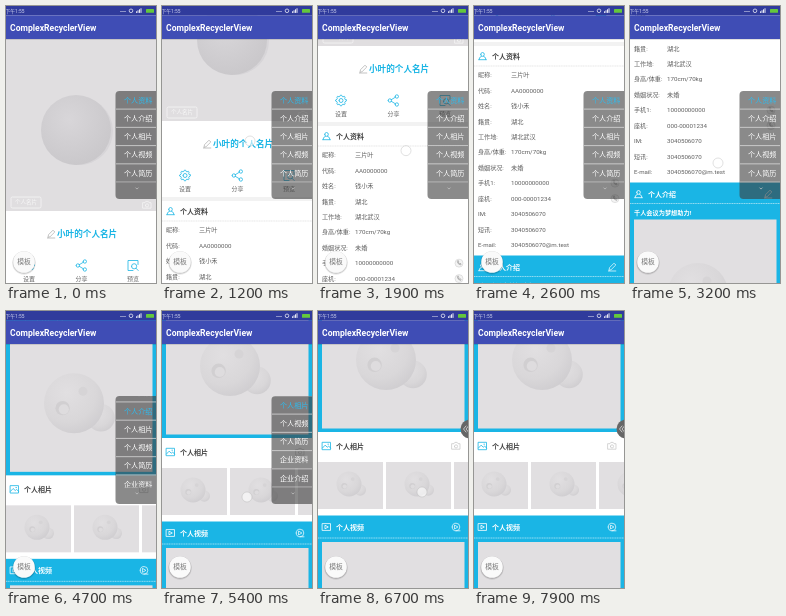
These frames come from a looping animation (150x277 px, 8 s). An HTML page:

```html
<!DOCTYPE html>
<html lang="zh-CN">
<head>
<meta charset="utf-8">
<style>
  html, body { margin: 0; width: 100%; height: 100%; overflow: hidden; background: #fff; }
  svg { display: block; width: 100vw; height: 100vh; }
  text { font-family: Roboto, "Noto Sans CJK SC", "Noto Sans CJK", sans-serif; }
</style>
</head>
<body>
<svg id="stage" viewBox="0 0 150 277" xmlns="http://www.w3.org/2000/svg"></svg>
<script>
const BLUE = '#1ab5e5', GRAY = '#e1dfe1', BOLD = 'font-weight="700"';
const LOOP = 8000, STEP = 100;

// Drawing helpers; text is placed by its vertical centre.
const text = (x, y, s, size, fill, extra = '') =>
  `<text x="${x}" y="${y + size * 0.36}" font-size="${size}" fill="${fill}" ${extra}>${s}</text>`;
const centered = (x, y, s, size, fill) => text(x, y, s, size, fill, 'text-anchor="middle"');
const rect = (x, y, w, h, fill, extra = '') =>
  `<rect x="${x}" y="${y}" width="${w}" height="${h}" fill="${fill}" ${extra}/>`;
const circle = (x, y, r, fill, extra = '') =>
  `<circle cx="${x}" cy="${y}" r="${r}" fill="${fill}" ${extra}/>`;
const icon = (x, y, d, color, width = 0.8) =>
  `<path transform="translate(${x} ${y})" d="${d}" fill="none" stroke="${color}" stroke-width="${width}" stroke-linecap="round" stroke-linejoin="round"/>`;
const dashes = (y, color) =>
  `<path d="M0 ${y}H150" stroke="${color}" stroke-width=".7" stroke-dasharray="1.2 .5"/>`;

// Outline of an eight-toothed wheel around a round hub.
const gear = 'M' + Array.from({ length: 32 }, (_, i) => {
  const angle = (i - 0.5) * Math.PI / 16, r = i % 4 < 2 ? 5.4 : 4.2;
  return `${(r * Math.cos(angle)).toFixed(2)} ${(r * Math.sin(angle)).toFixed(2)}`;
}).join('L') + 'zM-2 0a2 2 0 1 0 4 0a2 2 0 1 0 -4 0';

const ICONS = {
  gear,
  person: 'M-1.8 -1.6a1.8 1.9 0 1 0 3.6 0a1.8 1.9 0 1 0 -3.6 0M-3.6 3.7q.3 -3 2.5 -3.4M3.6 3.7q-.3 -3 -2.5 -3.4M-3.6 3.7H3.6',
  pencil: 'M-3 3l.6 -2.4l4.4 -4.4l1.8 1.8l-4.4 4.4zM-3.6 4H3.8',
  picture: 'M-4 -3.7H4V3.7H-4zM-4 2l2.6 -2.8l2.2 2l1.3 -1.2L4 2M1.4 -1.8h.6',
  video: 'M-4 -3.4H4V3.4H-4zM-1.2 -1.6L1.8 0L-1.2 1.6z',
  camera: 'M-4 -2.3h2l.8 -1.3h2.4l.8 1.3h2v5.5H-4zM-1.6 .4a1.6 1.6 0 1 0 3.2 0a1.6 1.6 0 1 0 -3.2 0',
  reel: 'M-3.8 0a3.8 3.8 0 1 0 7.6 0a3.8 3.8 0 1 0 -7.6 0M-1.2 -1.8L1.9 0L-1.2 1.8zM0 3.8H4',
  share: 'M-5.4 0a1.7 1.7 0 1 0 3.4 0a1.7 1.7 0 1 0 -3.4 0M1.6 -4a1.7 1.7 0 1 0 3.4 0a1.7 1.7 0 1 0 -3.4 0M1.6 4a1.7 1.7 0 1 0 3.4 0a1.7 1.7 0 1 0 -3.4 0M-2.2 -.8L1.7 -3.2M-2.2 .8L1.7 3.2',
  preview: 'M5 -1V-5H-5V5H0M-1.5 .8a2.6 2.6 0 1 0 5.2 0a2.6 2.6 0 1 0 -5.2 0M3 2.8L5.2 5',
  phone: 'M-1.7 -1.6q.3 2.8 3.3 3.4l.5 -1l-1.2 -.8l-.6 .5q-.8 -.4 -1 -1.2l.5 -.5l-.6 -1.2z'
};

// Pale embossed placeholder, r being the radius of the large ball.
const planet = (x, y, r) =>
  circle(x + r * 0.9, y + r * 0.48, r * 0.46, 'url(#ball)') +
  circle(x, y, r, 'url(#ball)') +
  circle(x - r * 0.38, y + r * 0.16, r * 0.24, '#d1cfd1') +
  circle(x - r * 0.34, y + r * 0.2, r * 0.17, '#dedcde') +
  circle(x + r * 0.3, y - r * 0.4, r * 0.15, '#d6d4d6');

const heading = (y, label, left, right, dark) => {
  const color = dark ? '#444' : '#fff';
  return icon(8.5, y, ICONS[left], dark ? BLUE : '#fff') +
    text(18, y, label, 7, color, BOLD) +
    (right ? icon(138, y, ICONS[right], dark ? '#c4c4c4' : '#fff', 0.7) : '');
};

const rows = [
  ['昵称', '三片叶'], ['代码', 'AA0000000'], ['姓名', '钱小禾'], ['籍贯', '湖北'],
  ['工作地', '湖北武汉'], ['身高/体重', '170cm/70kg'], ['婚姻状况', '未婚'],
  ['手机1', '10000000000'], ['座机', '000-00001234'], ['IM', '3040506070'],
  ['短讯', '3040506070'], ['E-mail', '3040506070@m.test']
];
const profile = rows.map(([label, value], i) => {
  const y = 314 + i * 15.45;
  const phone = i === 7 || i === 8
    ? circle(141, y, 4, '#f4f4f4', 'stroke="#c8c8c8" stroke-width=".5"') + icon(141, y, ICONS.phone, '#999', 0.7) : '';
  return text(4, y, label + ':', 6.1, '#5c5c5c') + text(37, y, value, 6.2, '#5c5c5c') + phone;
}).join('');

const actions = [[23, '设置', 'gear'], [75.5, '分享', 'share'], [127, '预览', 'preview']]
  .map(([x, label, name]) => icon(x, 259.5, ICONS[name], BLUE) + centered(x, 272.5, label, 6, '#666')).join('');

const cards = Array.from({ length: 6 }, (_, i) =>
  rect(i * 68, 707, 65, 47, GRAY) + planet(i * 68 + 31, 729, 12.5)).join('');

const page =
  rect(0, 32, 150, 173, '#e0dee0') + circle(73, 125, 34, '#d7d5d8') + circle(70, 124, 35, 'url(#cover)') +
  rect(5, 191, 30, 11, 'none', 'rx="1.5" stroke="#f8f8f8" stroke-width=".7"') +
  centered(20, 196.5, '个人名片', 5.5, '#f8f8f8') + icon(141, 199, ICONS.camera, '#f8f8f8', 0.7) +
  icon(45, 228, ICONS.pencil, '#aaa', 0.7) + text(51, 228, '小叶的个人名片', 8.6, BLUE, BOLD) +
  actions + rect(0, 281, 150, 4, '#f2f2f2') +
  heading(295, '个人资料', 'person', '', true) + dashes(305, '#ddd') + profile +
  rect(0, 494.5, 150, 182.5, BLUE) + heading(506, '个人介绍', 'person', 'pencil') + dashes(515.5, '#c4ecf8') +
  text(4, 525, '千人会议为梦想助力!', 6.2, '#fff', BOLD) +
  rect(4, 531.5, 142.5, 142, GRAY) + planet(68, 605, 30) +
  heading(691, '个人相片', 'picture', 'camera', true) + `<g id="cards">${cards}</g>` +
  rect(0, 760.5, 150, 100, BLUE) + heading(772, '个人视频', 'video', 'reel') + dashes(783, '#c4ecf8') +
  rect(4, 787, 142.5, 70, GRAY);

const ITEM = 18.25;
const menuItems = ['个人资料', '个人介绍', '个人相片', '个人视频', '个人简历', '企业资料', '企业介绍']
  .map((label, i) => `<g class="item">${text(118, 94 + i * ITEM, label, 7.1, 'currentColor')}</g>` +
    `<path d="M110 ${103.1 + i * ITEM}H150" stroke="#e4e4e4" stroke-width=".7"/>`).join('');

stage.innerHTML = `
  <defs>
    <radialGradient id="ball" cx=".38" cy=".32" r=".75">
      <stop stop-color="#e1dfe1"/><stop offset=".65" stop-color="#d9d7d9"/><stop offset="1" stop-color="#cecccf"/>
    </radialGradient>
    <radialGradient id="cover" cx=".4" cy=".35" r=".7">
      <stop stop-color="#d8d6d9"/><stop offset="1" stop-color="#c9c7ca"/>
    </radialGradient>
    <clipPath id="menuClip"><rect x="110" y="85" width="40" height="91.6"/></clipPath>
  </defs>
  <g id="page">${page}</g>
  <g id="menu">
    ${rect(109.5, 85, 45, 108, '#3c3c3c', 'rx="4" fill-opacity=".6"')}
    <g clip-path="url(#menuClip)"><g id="menuList">${menuItems}</g></g>
    ${icon(131, 182.5, 'M-1.2 -.6L0 .6L1.2 -.6', '#ccc', 0.7)}
  </g>
  <g id="tab">${circle(152, 118, 9.5, '#666')}${icon(147, 118, 'M1 -3L-1.5 0L1 3M3.5 -3L1 0L3.5 3', '#ddd')}</g>
  ${circle(18, 257, 11.8, '#000', 'opacity=".09"')}${circle(18, 256.6, 11.3, '#000', 'opacity=".12"')}
  ${circle(18, 256, 10.8, '#fafafa')}${centered(18, 256, '模板', 6.8, '#777')}
  ${rect(0, 0, 150, 9.5, '#303b9c')}${rect(0, 9.5, 150, 23.5, '#3f4db5')}
  ${rect(0, 33, 150, 1, '#000', 'opacity=".12"')}
  ${text(-0.5, 4.8, '下午1:55', 4.8, '#d5d8f0')}
  ${[115, 117, 119].map(x => circle(x, 5.5, 0.6, '#fff')).join('')}
  ${circle(125, 4.8, 1.8, 'none', 'stroke="#fff" stroke-width=".7"')}
  ${icon(133, 6.5, 'M-2.5 0V-.8M-1 0V-1.8M.5 0V-2.8M2 0V-3.8', '#fff', 0.9)}
  ${rect(140, 3, 8, 3.8, '#64c83c', 'rx=".6"')}
  ${text(4, 22, 'ComplexRecyclerView', 8.6, '#fff', BOLD)}
  <g id="finger">${circle(0, 0, 5, '#fff', 'fill-opacity=".6" stroke="#aaa" stroke-opacity=".6" stroke-width=".6"')}</g>`;

const [pageEl, cardsEl, menuEl, listEl, tabEl, fingerEl] =
  ['page', 'cards', 'menu', 'menuList', 'tab', 'finger'].map(id => document.getElementById(id));
const items = [...document.querySelectorAll('.item')];

const scrollKeys = [[700, 0], [1200, 90], [1600, 133], [1900, 165], [2400, 235], [2700, 250], [2800, 250],
  [3200, 318], [3500, 350], [3600, 350], [4200, 427], [4600, 505], [4900, 528], [5000, 528], [5400, 550], [5900, 556]];
// Vertical drags: start, end, x, starting y.
const drags = [[600, 1200, 88, 225], [1700, 2100, 88, 166], [2800, 3300, 88, 225], [3600, 3900, 88, 215], [5000, 5500, 85, 208]];

function valueAt(keys, t) {
  const i = keys.findIndex(([time]) => time > t);
  if (i === 0) return keys[0][1];
  if (i < 0) return keys[keys.length - 1][1];
  const [t0, a] = keys[i - 1], [t1, b] = keys[i];
  return a + (b - a) * (t - t0) / (t1 - t0);
}
const progress = (t, from, to) => Math.min(1, Math.max(0, (t - from) / (to - from)));
const move = (el, x, y) => el.setAttribute('transform', `translate(${x} ${y})`);
const show = (el, on) => el.setAttribute('visibility', on ? 'visible' : 'hidden');

function render(t) {
  const scroll = valueAt(scrollKeys, t);
  move(pageEl, 0, -scroll);

  const swipe = -147 * (1 - (1 - progress(t, 6700, 7900)) ** 2.2);
  move(cardsEl, swipe, 0);

  const listStep = 2 * progress(t, 4600, 4900);
  move(listEl, 0, -listStep * ITEM);
  items.forEach((el, i) => el.style.color = i === Math.round(listStep) ? '#2cbcf0' : '#fff');
  move(menuEl, 42 * progress(t, 5900, 6300), 0);
  show(menuEl, t < 6300);
  show(tabEl, t >= 6300);

  const drag = drags.find(([from, to]) => t >= from && t <= to);
  const swiping = t >= 6700 && t < 7000;
  show(fingerEl, drag || swiping);
  if (drag) move(fingerEl, drag[2], drag[3] - scroll + valueAt(scrollKeys, drag[0]));
  else if (swiping) move(fingerEl, 104 + swipe, 181);
}

function tick() {
  const t = performance.now() % LOOP;
  render(Math.floor(t / STEP) * STEP);
  requestAnimationFrame(tick);
}
tick();
</script>
</body>
</html>
```
